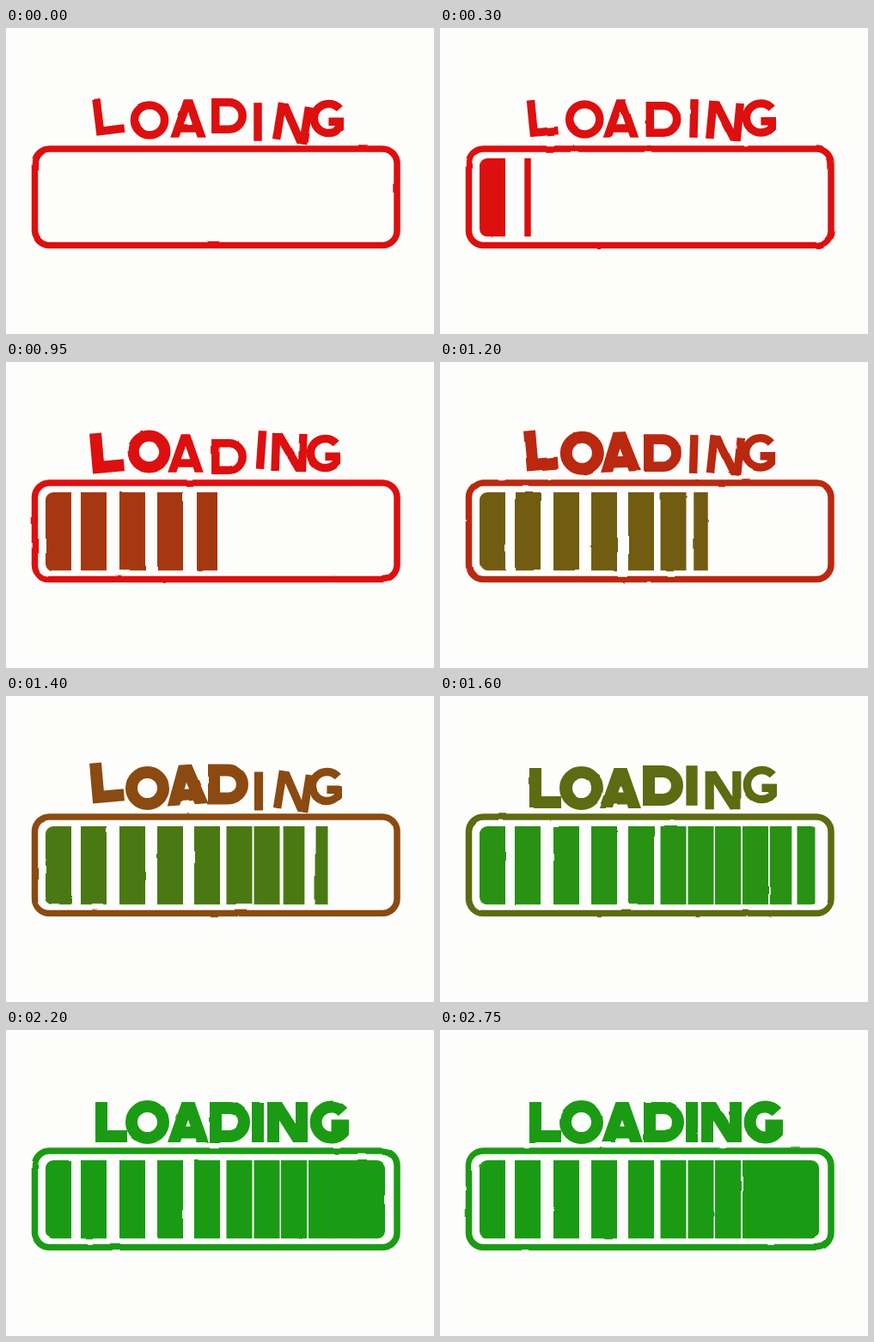
An HTML page that plays this animation: 498 px wide and 357 px high, repeating every 2.8 s.

```html
<!DOCTYPE html>
<html lang="en">
<head>
<meta charset="utf-8">
<title>Loading</title>
<style>
  html, body { margin: 0; width: 100%; height: 100%; overflow: hidden; background: #fdfefc; }
  svg { display: block; }
</style>
</head>
<body>
<svg width="498" height="357" viewBox="0 0 498 357" role="img" aria-label="LOADING">
  <defs>
    <filter id="boil" filterUnits="userSpaceOnUse" x="0" y="0" width="498" height="357" color-interpolation-filters="sRGB">
      <feTurbulence id="noise" type="fractalNoise" baseFrequency=".035" numOctaves="1"/>
      <feDisplacementMap in="SourceGraphic" scale="2.4" xChannelSelector="R" yChannelSelector="G"/>
    </filter>
    <clipPath id="caps"><rect x="-30" y="-23.5" width="60" height="47"/></clipPath>
    <clipPath id="inside"><rect x="46" y="152" width="395" height="91.5" rx="9"/></clipPath>
  </defs>
  <g filter="url(#boil)">
    <g id="outline" fill="none">
      <rect x="33.5" y="141" width="421.5" height="112.5" rx="17" stroke-width="7.5"/>
      <g id="word"></g>
    </g>
    <g id="bars" clip-path="url(#inside)"></g>
  </g>
</svg>
<script>
const LOOP = 2800, STEP = 50;
const RED = [221, 15, 15], GREEN = [27, 155, 20];
const $ = id => document.getElementById(id);
const clamp = v => Math.min(1, Math.max(0, v));
const lerp = (a, b, u) => a + (b - a) * u;

function add(parent, tag, attrs) {
  const el = document.createElementNS('http://www.w3.org/2000/svg', tag);
  for (const name in attrs) el.setAttribute(name, attrs[name]);
  return parent.appendChild(el);
}

// Piecewise interpolation of values over ascending times
function track(times, values, t, ease = u => u) {
  let i = 0;
  while (i < times.length - 2 && t >= times[i + 1]) i++;
  const u = clamp((t - times[i]) / (times[i + 1] - times[i]));
  return lerp(values[i], values[i + 1], ease(u));
}
const smooth = u => u * u * (3 - 2 * u);
const mix = u => `rgb(${RED.map((c, i) => Math.round(lerp(c, GREEN[i], u)))})`;

// x: resting centre, bold: when the letter starts to thicken,
// dx, dy, turn: offsets from rest at each pose time
const POSE_TIMES = [0, 600, 950, 1400, 1600, 1850];
const letters = [
  { x: 122.5, bold: 450, d: 'M-11.5-23.5V16.5H18.5',
    dx: [-4, -4, -5, -5, 0, 0], dy: [-4, 0, -2, -7, 0, 0], turn: [-7, -4, -5, -5, 0, 0] },
  { x: 164.5, bold: 700, d: 'M-18.5 0a18.5 18.5 0 1 0 37 0a18.5 18.5 0 1 0-37 0z',
    dx: [2.5, 5, 2, 0, 0, 0], dy: [0, -2, -3, 0, 0, 0] },
  { x: 212, bold: 950, clip: true, d: 'M-18.7 29.5L2-29.5M18.7 29.5L-2-29.5M-11 12H11',
    dx: [0, -3, -3, -2, -2, 0], dy: [-2, -2, -1, -4, 0, 0], turn: [0, 0, 0, -4, 0, 0] },
  { x: 260.5, bold: 1050, d: 'M-16.5-16.5H0a16.5 16.5 0 0 1 0 33H-16.5z',
    dx: [-1, 0, -1, -2, -1, 0], dy: [-5, 3, 3, -4.5, -3, 0] },
  { x: 293, bold: 1350, d: 'M0-23.5V23.5',
    dx: [0, 5, 4, 1, 0, 0], dy: [2, -6, -5, 3.5, -3, 0], turn: [0, 3, 4, 0, 0, 0] },
  { x: 327.5, bold: 1550, clip: true, d: 'M-16.5 23.5V-23.5M16.5 23.5V-23.5M-14-22L14 22',
    dx: [6, 2, 2, 7, 2, 0], dy: [4, -2, -2, 4, 2.5, 0], turn: [9, 2, 2, 9, 0, 0] },
  { x: 376.5, bold: 1650, d: 'M15.5-12A18 18 0 1 0 15.5 12V4H2',
    dx: [-3, -7, -7, -5, -4, 0], dy: [-2, -3, -1, -2, -4, 0] },
];
for (const letter of letters) {
  letter.el = add($('word'), 'path', { d: letter.d });
  if (letter.clip) letter.el.setAttribute('clip-path', 'url(#caps)');
}

const BAR_WIDTH = 30, BAR_GROWTH = 200;
const centres = [61, 102, 147, 191, 234, 271.5, 303.5, 335, 367, 396.5, 426];
const starts = [0, 250, 450, 620, 790, 950, 1090, 1235, 1300, 1430, 1460];
const bars = centres.map(() => add($('bars'), 'rect', { y: 152, height: 91.5 }));

function draw(t) {
  $('noise').setAttribute('seed', t / STEP + 1);
  $('outline').setAttribute('stroke', mix(clamp((t - 1050) / 833)));
  $('bars').setAttribute('fill', mix(track([350, 600, 950, 1400, 1600, 1800], [0, .07, .29, .76, .93, 1], t)));

  for (const { el, x, bold, dx, dy, turn } of letters) {
    const heavy = clamp((t - bold) / 300);
    const pose = values => values ? track(POSE_TIMES, values, t, smooth) : 0;
    el.setAttribute('stroke-width', 10 + 4 * heavy);
    el.setAttribute('transform',
      `translate(${x + pose(dx)} ${107.5 + pose(dy)}) rotate(${pose(turn)}) scale(${.95 + .05 * heavy})`);
  }

  // Each bar widens from its own centre
  bars.forEach((bar, i) => {
    const width = BAR_WIDTH * clamp((t - starts[i]) / BAR_GROWTH);
    bar.setAttribute('x', centres[i] - width / 2);
    bar.setAttribute('width', width);
  });
}

const begin = performance.now();
function tick() {
  const t = (performance.now() - begin) % LOOP;
  draw(Math.floor(t / STEP) * STEP);
  requestAnimationFrame(tick);
}
tick();
</script>
</body>
</html>
```
